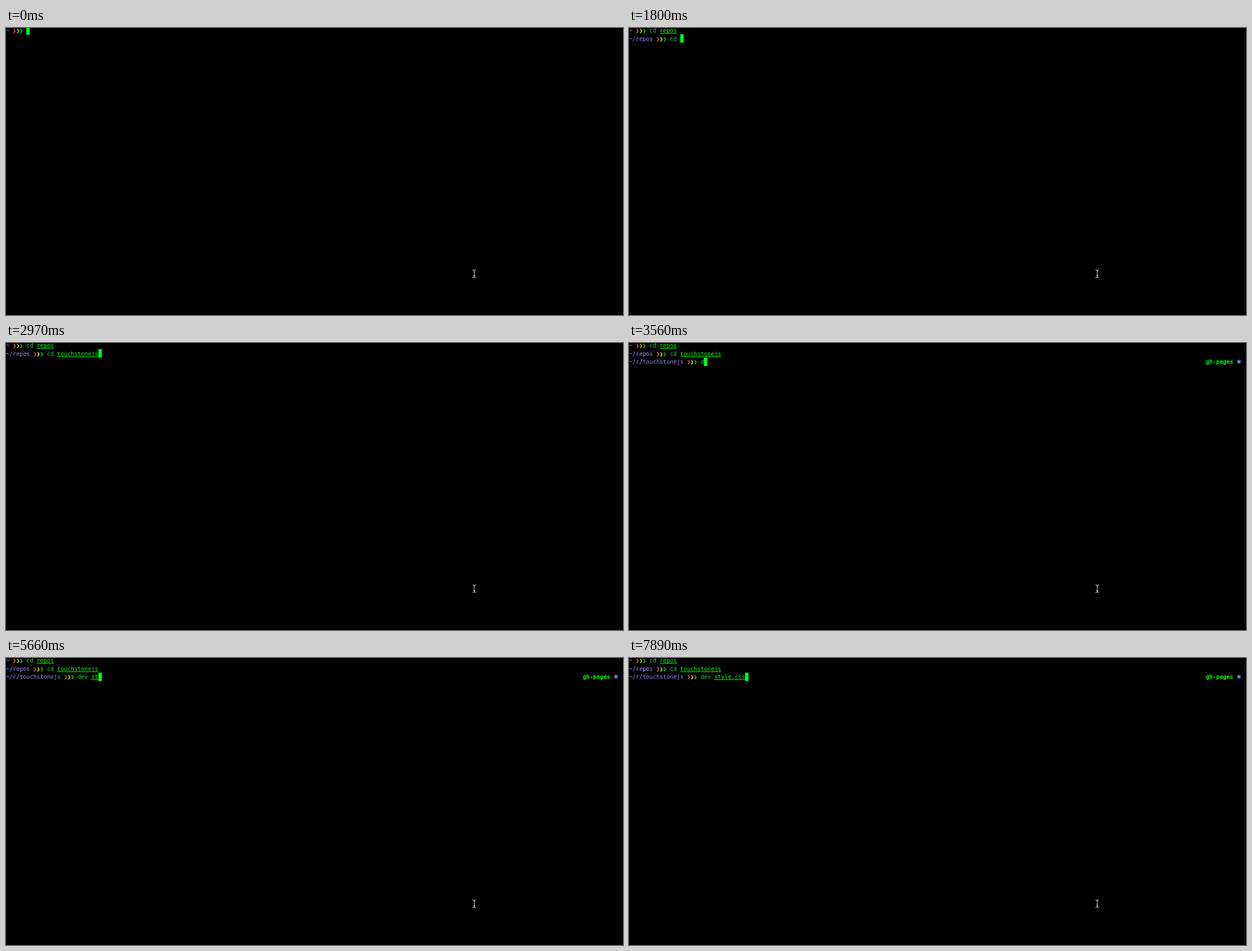
These frames come from a looping animation (1095x511 px, 8 s). An HTML page with a canvas:

```html
<!DOCTYPE html>
<html lang="en">
<head>
<meta charset="utf-8">
<title>Terminal</title>
<style>
html, body { margin: 0; width: 1095px; height: 511px; overflow: hidden; background: #000; }
canvas { display: block; }
</style>
</head>
<body>
<canvas id="stage" width="1095" height="511"></canvas>
<script>
const ctx = document.getElementById('stage').getContext('2d');
const LOOP = 8000, CELL = 6.058, ROW = 14.67;
const GREEN = '#00ff00', CURSOR = '#00ff1c', COMMAND = '#2cd043', PATH = '#9488f0';
const MONO = '10.07px "DejaVu Sans Mono", monospace';
const BOLD = 'bold ' + MONO;
const SYMBOL = '10.07px "DejaVu Sans", sans-serif';

const lines = [
  { path: '~', command: 'cd', arg: 'repos' },
  { path: '~/repos', command: 'cd', arg: 'touchstonejs' },
  { path: '~/r/touchstonejs', command: 'dev', arg: 'style.css' }
];
const fullText = row => lines[row].command + ' ' + lines[row].arg;

const states = [];
const show = (time, row, typed) => states.push({ time, row, typed });

// Types evenly from one length to another in a number of equal steps.
function type(row, start, end, steps, from, to) {
  for (let i = 0; i < steps; i++) {
    const k = i / (steps - 1);
    show(start + (end - start) * k, row, fullText(row).slice(0, Math.round(from + (to - from) * k)));
  }
}

// Enter moves the cursor down; the next prompt follows shortly after.
function enter(time, row) {
  show(time, row, null);
  show(time + 140, row, '');
}

show(0, 0, '');
type(0, 290, 1060, 6, 2, 8);
enter(1210, 1);
type(1, 1650, 2970, 10, 2, 15);
enter(3120, 2);
type(2, 3560, 4010, 4, 1, 4);
show(4310, 2, 'dev t');
show(4910, 2, 'dev st');
show(5210, 2, 'dev str');
show(5660, 2, 'dev st');
show(5810, 2, 'dev sty');
show(6250, 2, 'dev st');
type(2, 7300, 7890, 5, 7, 13);

const baseline = row => Math.round(8 + row * ROW);
const edge = col => Math.round(col * CELL);

function write(text, col, row, color, font = MONO) {
  ctx.font = font;
  ctx.fillStyle = color;
  [...text].forEach((ch, i) => ctx.fillText(ch, (col + i) * CELL, baseline(row)));
}

// Draws one prompt line and returns the column after it.
function drawLine(row, typed = fullText(row)) {
  const { path, arg: target } = lines[row];
  const start = path.length + 5;
  write(path, 0, row, PATH);
  ['#ff7058', '#ffff20', '#10f018'].forEach((color, i) =>
    write('❯', path.length + 1 + i, row, color, BOLD));

  const [command, arg = ''] = typed.split(' ');
  const argCol = start + command.length + 1;
  const exists = target.startsWith(arg);
  write(command, start, row, COMMAND);
  write(arg, argCol, row, exists ? GREEN : COMMAND);
  if (exists) {
    ctx.fillRect(edge(argCol), baseline(row) + 1, edge(argCol + arg.length) - edge(argCol), 1);
  }
  if (row === 2) {
    write('gh-pages', 169, row, GREEN, BOLD);
    write('✱', 178, row, '#8484ff', SYMBOL);
  }
  return start + typed.length;
}

function drawCursor(col, row) {
  const top = Math.round(row * ROW - 3.35);
  ctx.fillStyle = CURSOR;
  ctx.fillRect(edge(col), top, edge(col + 1) - edge(col), 15);
}

const pointer = new Path2D(
  'M828 430.5 Q831 430.5 831 433 Q831 430.5 834 430.5 M831 432 V443' +
  'M828 444.5 Q831 444.5 831 442 Q831 444.5 834 444.5 M829.5 440.5 H832.5');

function draw(now) {
  const time = now % LOOP;
  const { row, typed } = states.findLast(s => s.time <= time);
  ctx.fillStyle = '#000';
  ctx.fillRect(0, 0, 1095, 511);
  for (let past = 0; past < row; past++) drawLine(past);
  drawCursor(typed === null ? 0 : drawLine(row, typed), row);
  ctx.strokeStyle = '#e0e0e0';
  ctx.stroke(pointer);
}

const origin = performance.now();
function tick() {
  draw(performance.now() - origin);
  requestAnimationFrame(tick);
}
tick();
</script>
</body>
</html>
```
